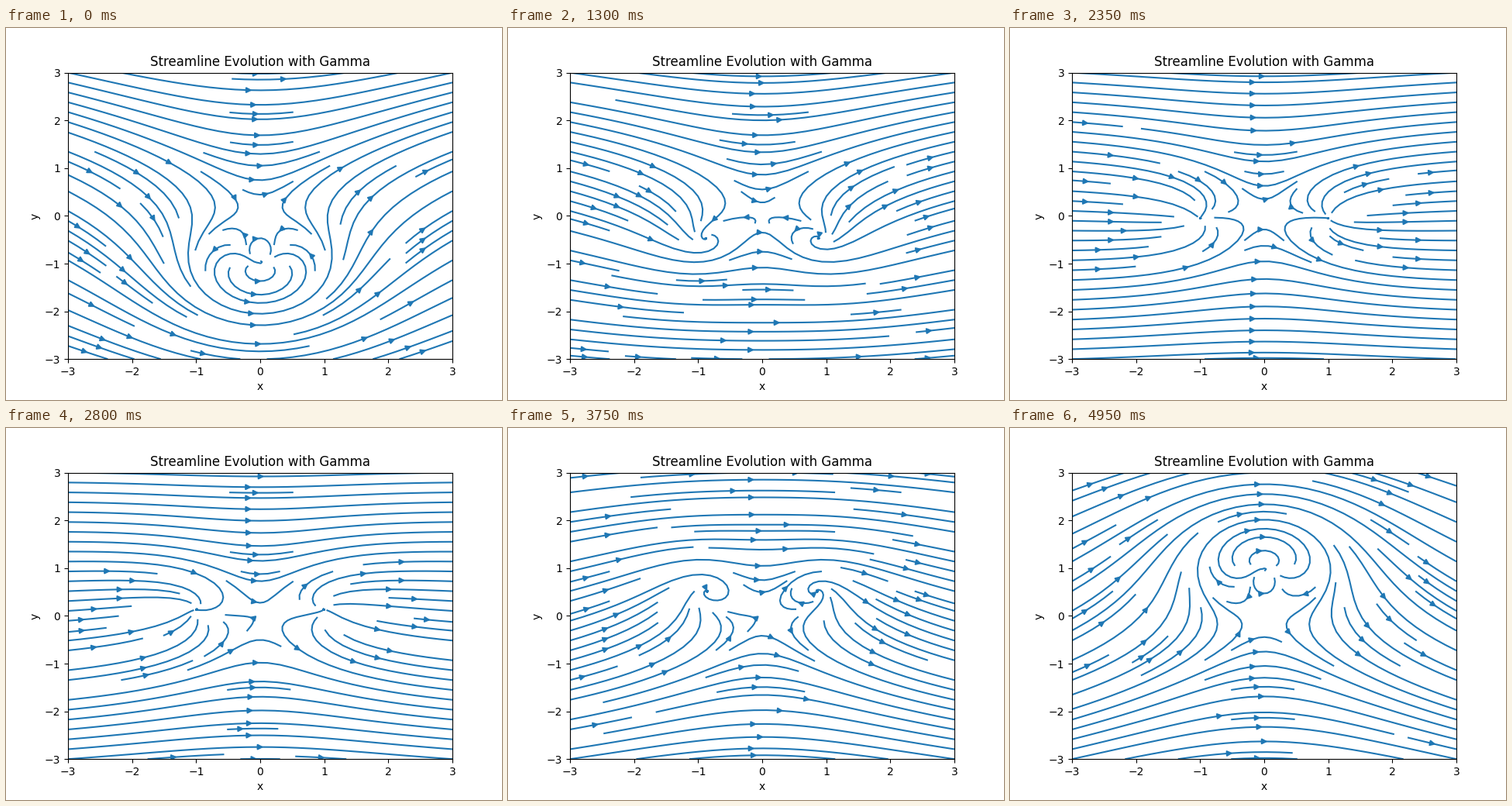
These frames come from a looping animation (640x480 px, 5000 ms). A matplotlib script:

```python
import numpy as np
import matplotlib.pyplot as plt
from matplotlib.animation import FuncAnimation
from matplotlib.collections import LineCollection, PolyCollection
from matplotlib.transforms import IdentityTransform

FRAMES = 100
INTERVAL = 50
LIMIT = 3
GRID = 100          # velocity samples per side
CELLS = 30          # spacing mask cells per side
MAX_STEP = 1 / CELLS
MAX_ERROR = 0.003
MIN_LENGTH, MAX_LENGTH = 0.1, 4.0
COLOR = "C0"
LINE_WIDTH = 1.5

axis = np.linspace(-LIMIT, LIMIT, GRID)
Z = axis[None, :] + 1j * axis[:, None]
gammas = np.linspace(4 * np.pi, -4 * np.pi, FRAMES)


def velocity(gamma):
    """u + iv on the grid: uniform flow, doublet and vortex."""
    return 1 - 1 / Z**2 + 1j * gamma / (2 * np.pi * Z)


def inside(p):
    return 0 <= p.real <= 1 and 0 <= p.imag <= 1


def spiral(n):
    """Cells of an n by n square, from the border inwards."""
    left, right, low, high = 0, n - 1, 0, n - 1
    while left <= right and low <= high:
        yield from ((i, low) for i in range(left, right + 1))
        yield from ((right, j) for j in range(low + 1, high + 1))
        yield from ((i, high) for i in range(right - 1, left - 1, -1))
        yield from ((left, j) for j in range(high - 1, low, -1))
        left, right, low, high = left + 1, right - 1, low + 1, high - 1


STARTS = list(spiral(CELLS))


class Tracer:
    """Evenly spaced streamlines in unit square coordinates."""

    def __init__(self, field):
        self.field = field.tolist()
        self.speed = np.abs(field).tolist()
        self.used = set()
        self.trail = []
        self.cell = None

    def heading(self, p):
        x, y = p.real * (GRID - 1), p.imag * (GRID - 1)
        i, j = min(int(x), GRID - 2), min(int(y), GRID - 2)
        fx, fy = x - i, y - j

        def blend(a):
            low, high = a[j], a[j + 1]
            return ((low[i] * (1 - fx) + low[i + 1] * fx) * (1 - fy)
                    + (high[i] * (1 - fx) + high[i + 1] * fx) * fy)

        return blend(self.field) / blend(self.speed)

    @staticmethod
    def cell_of(p):
        return round(p.real * (CELLS - 1)), round(p.imag * (CELLS - 1))

    def claim(self, p):
        cell = self.cell_of(p)
        if cell != self.cell:
            if cell in self.used:
                return False
            self.used.add(cell)
            self.trail.append(cell)
            self.cell = cell
        return True

    def walk(self, p, sign):
        step, total, path = MAX_STEP, 0.0, []
        while True:
            path.append(p)
            k1 = sign * self.heading(p)
            ahead = p + step * k1
            if not inside(ahead):
                # run straight to the border
                reach = min(((c > 0) - a) / c
                            for a, c in ((p.real, k1.real), (p.imag, k1.imag))
                            if c)
                path.append(p + reach * k1)
                return total + reach, path
            k2 = sign * self.heading(ahead)
            error = abs(k2 - k1) * step / 2
            if error < MAX_ERROR:
                p += step * (k1 + k2) / 2
                if not inside(p) or not self.claim(p):
                    return total, path
                if total + step > MAX_LENGTH:
                    return total, path
                total += step
            if error == 0:
                step = MAX_STEP
            else:
                step = min(MAX_STEP, 0.85 * step * (MAX_ERROR / error) ** 0.5)

    def trace(self, start):
        self.trail = []
        self.claim(start)
        back_length, back = self.walk(start, -1)
        self.cell = self.cell_of(start)
        length, ahead = self.walk(start, 1)
        if back_length + length > MIN_LENGTH:
            return np.array(back[::-1] + ahead[1:])
        self.used.difference_update(self.trail)
        return None

    def lines(self):
        for i, j in STARTS:
            if (i, j) not in self.used:
                line = self.trace(complex(i / (CELLS - 1), j / (CELLS - 1)))
                if line is not None:
                    yield line


def arrow_head(line):
    """Triangle in pixels, halfway along the line."""
    s = np.cumsum(np.abs(np.diff(line)))
    n = np.searchsorted(s, s[-1] / 2)
    box, pt = ax.bbox, fig.dpi / 72
    pair = line[n:n + 2]
    tail, end = (box.x0 + box.width * pair.real
                 + 1j * (box.y0 + box.height * pair.imag))
    tip = (tail + end) / 2
    length = abs(tip - tail)
    d = (tip - tail) / length
    gap = 2 * pt
    if length > gap:
        length -= gap
    if length > gap:
        tip -= gap * d
    apex = tip - 0.5 * LINE_WIDTH * 5**0.5 * pt * d
    base = apex - 4 * pt * d
    side = 2j * pt * d
    return [(c.real, c.imag) for c in (base + side, apex, base - side)]


fig, ax = plt.subplots(figsize=(6.4, 4.8), dpi=100)
ax.set(xlim=(-LIMIT, LIMIT), ylim=(-LIMIT, LIMIT), xlabel="x", ylabel="y",
       title="Streamline Evolution with Gamma")

streams = LineCollection([], colors=COLOR, linewidths=LINE_WIDTH,
                         transform=ax.transAxes, zorder=2)
heads = PolyCollection([], facecolors=COLOR, edgecolors=COLOR,
                       linewidths=LINE_WIDTH, joinstyle="round",
                       transform=IdentityTransform(), zorder=2)
for artist in (streams, heads):
    ax.add_collection(artist, autolim=False)


def update(frame):
    lines = list(Tracer(velocity(gammas[frame])).lines())
    streams.set_segments([np.column_stack((p.real, p.imag)) for p in lines])
    heads.set_verts([arrow_head(p) for p in lines])
    return streams, heads


anim = FuncAnimation(fig, update, frames=FRAMES, interval=INTERVAL,
                     repeat=True, repeat_delay=0)
plt.show()
```
